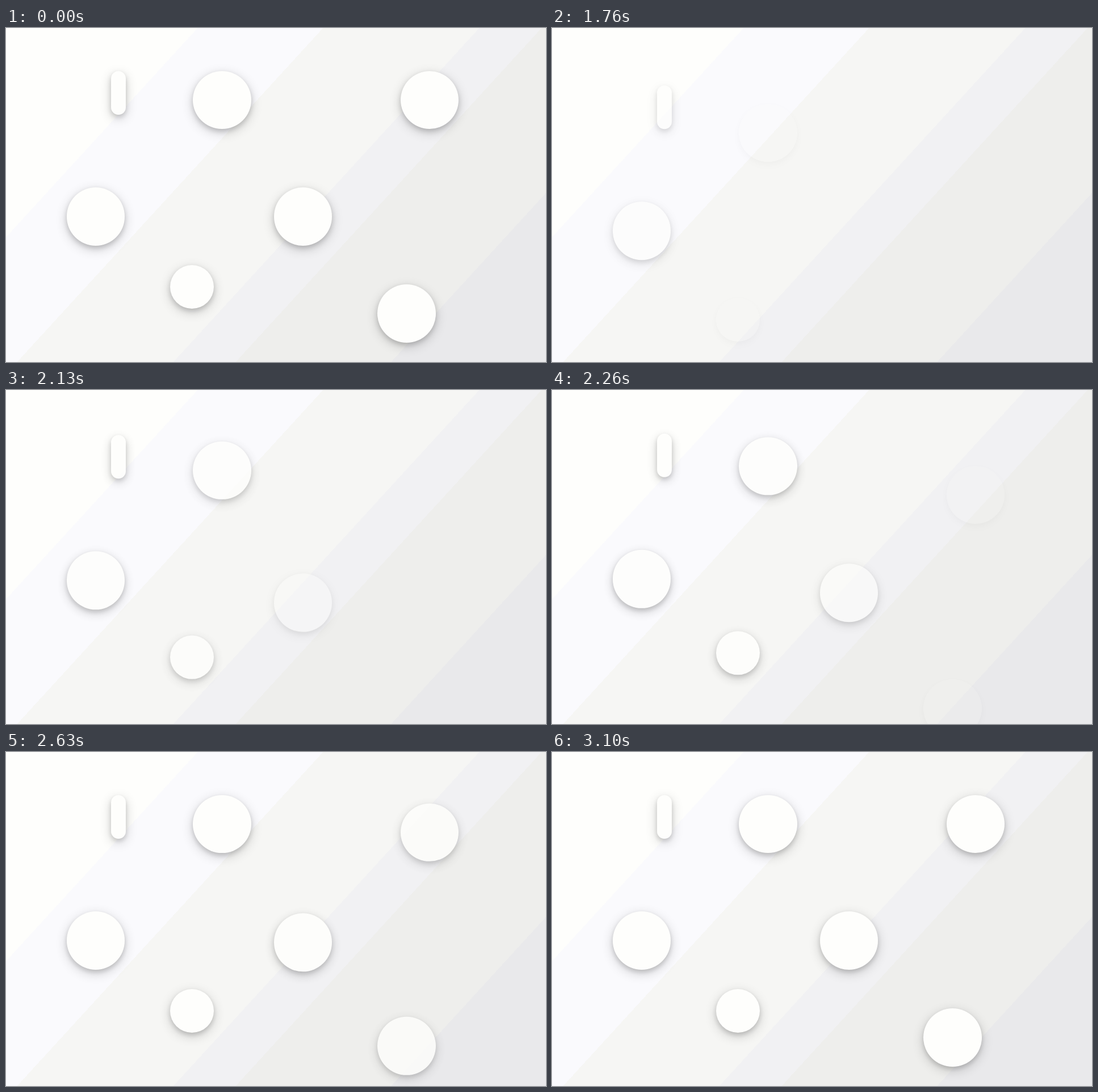
An HTML page for the animation above (5500 ms loop, 951 px wide and 589 px high).

```html
<!DOCTYPE html>
<html lang="en">
<head>
<meta charset="utf-8">
<title>Staggered shapes</title>
<style>
  html, body { margin: 0; width: 100%; height: 100%; overflow: hidden; }
  body {
    position: relative;
    background: linear-gradient(132.45deg,
      #fefefc 249px, #fafafd 0 412px, #f6f6f4 0 615px,
      #f1f1f3 0 696px, #eeeeec 0 898px, #e9e9eb 0);
  }
  div {
    position: absolute;
    border-radius: 60px;
    background: #fefefc;
    box-shadow: 0 4px 8px rgba(0, 0, 0, .15), 0 6px 20px rgba(0, 0, 0, .19);
  }
</style>
</head>
<body>
<script>
const LOOP = 5500, RESET = 1430, RESUME = 1630, SETTLED = 3100;
const STEP = 100 / 3, START = 1412, STAGGER = 250, DURATION = 1000;
const UNIT = 25.68, RISE = 2.5 * UNIT, PERIOD = 365.25;
const shapes = [];

// Positions in px, sizes in units.
function addShape(group, left, top, width, height = width) {
  const el = document.body.appendChild(document.createElement('div'));
  const box = { left, top, width: width * UNIT, height: height * UNIT };
  for (const key in box) el.style[key] = box[key] + 'px';
  shapes.push({ el, group });
}

// One pill, then three circles repeated in two columns.
addShape(0, 185, 75.6, 1, 3);
for (const column of [0, 1]) {
  const x = column * PERIOD, group = 2 * column;
  addShape(group, x + 106.5, 281, 4);
  addShape(group + 1, x + 329.4, 75.6, 4);
  addShape(group + 1, x + 289, 417.6 + column * 34.6, 3 + column);
}

const bezier = (s, a, b) => 3 * s * (1 - s) ** 2 * a + 3 * s * s * (1 - s) * b + s ** 3;

// cubic-bezier(.25, .1, .25, 1)
function ease(x) {
  if (x <= 0) return 0;
  if (x >= 1) return 1;
  let low = 0, high = 1;
  for (let i = 0; i < 24; i++) {
    const mid = (low + high) / 2;
    if (bezier(mid, .25, .25) < x) low = mid; else high = mid;
  }
  return bezier(low, .1, 1);
}

// Holds briefly after the reset, then advances at 30 steps a second.
function stageTime(t) {
  if (t < RESET || t >= SETTLED) return Infinity;
  if (t < RESUME) return RESET;
  return RESUME + Math.floor((t - RESUME + 4) / STEP) * STEP;
}

function draw() {
  const time = stageTime(performance.now() % LOOP);
  for (const { el, group } of shapes) {
    const p = ease((time - START - group * STAGGER) / DURATION);
    el.style.opacity = p;
    el.style.transform = `translateY(${(1 - p) * RISE}px)`;
  }
  requestAnimationFrame(draw);
}
draw();
</script>
</body>
</html>
```
